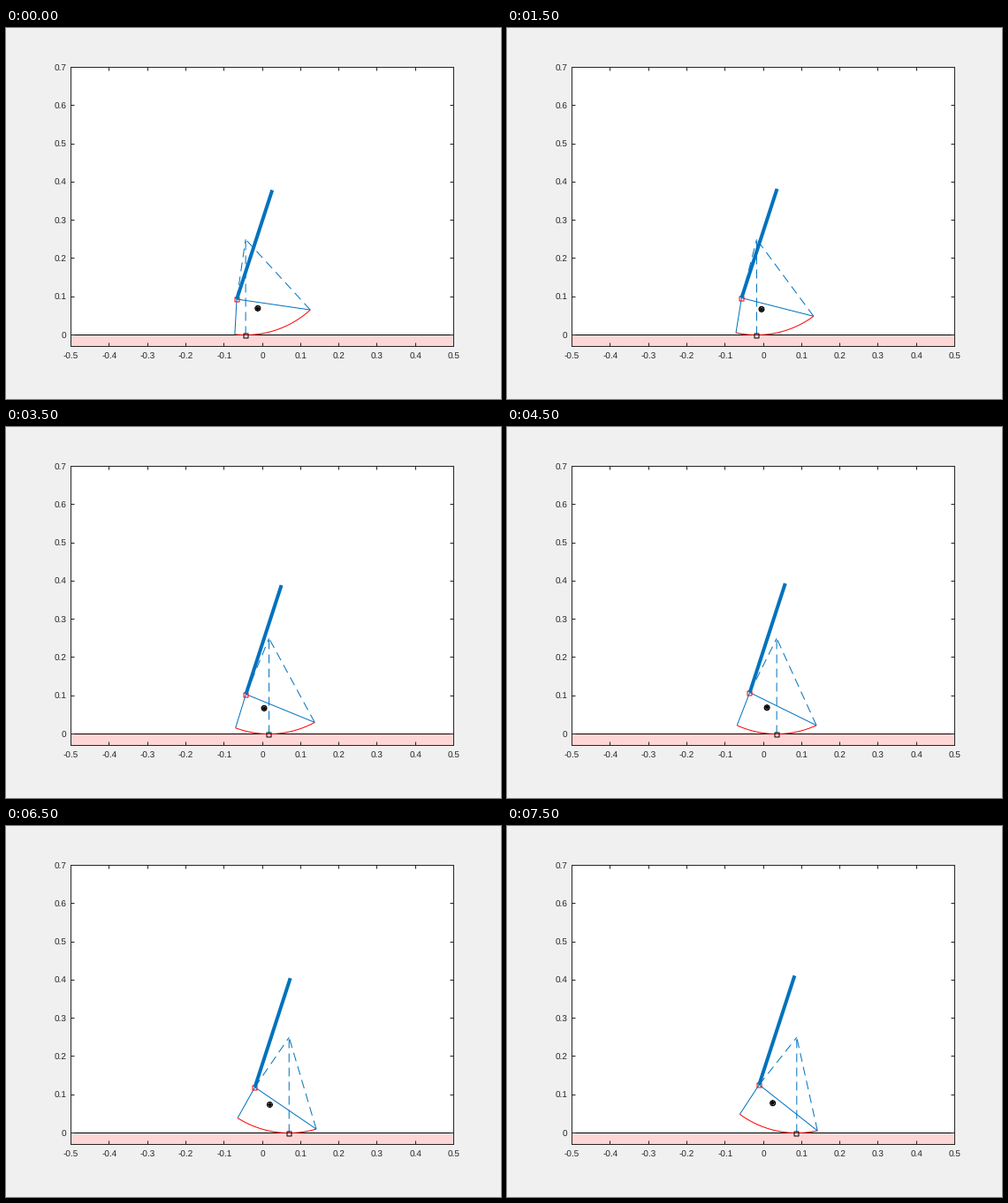
Animation of 560 by 420 pixels, one loop 8 s. Source, as a matplotlib script:

```python
import numpy as np
import matplotlib.pyplot as plt
from matplotlib.animation import FuncAnimation
from matplotlib.transforms import Affine2D

W, H, DPI = 560, 420, 70
PX = 72 / DPI                      # one pixel in points
FRAMES, INTERVAL = 16, 500

BLUE, RED, DARK = "#0072bd", "#ff0000", "#262626"
LEFT, TOP, WIDTH, HEIGHT = 73, 44, 433, 316  # axes box in pixels
XLIM, YLIM = (-0.5, 0.5), (-0.03, 0.7)
XTICKS, YTICKS = np.linspace(-0.5, 0.5, 11), np.linspace(0, 0.7, 8)

# Foot in its own frame, origin at the centre of the rolling arc
R = 0.25
HEEL, TOE = np.radians([-16.5, 32.5])
ARC = np.linspace(HEEL, TOE, 60)
SOLE = R * np.array([np.sin(ARC), -np.cos(ARC)])
ANKLE = np.array([-0.05, -0.15])
MASS = np.array([0.0, -0.183])
LEAN = np.radians(18)
SHANK = 0.3 * np.array([np.sin(LEAN), np.cos(LEAN)])

# Circle with an eight-armed star, three pixels in radius
TURNS = np.radians(np.arange(0, 361, 15))
RING = np.array([np.cos(TURNS), np.sin(TURNS)])
ARMS = [p for k in range(0, 24, 3) for p in ((np.nan, np.nan), (0, 0), RING[:, k])]
BADGE = np.hstack([RING, np.transpose(ARMS)]) * 3 / WIDTH

plt.rcParams["font.family"] = "Liberation Sans"
plt.rcParams["text.hinting"] = "none"
fig = plt.figure(figsize=(W / DPI, H / DPI), dpi=DPI, facecolor="#f0f0f0")
ax = fig.add_axes([LEFT / W, 1 - (TOP + HEIGHT) / H, WIDTH / W, HEIGHT / H])
ax.set(xlim=XLIM, ylim=YLIM, facecolor="white", xticks=XTICKS, yticks=YTICKS)
ax.tick_params(direction="in", length=4.5 * PX, width=PX, color=DARK,
               top=True, right=True, labelbottom=False, labelleft=False)
for spine in ax.spines.values():
    spine.set(linewidth=PX, color=DARK)

# Snapped strokes land half a pixel right and down; free ones are moved to match
free = ax.transData + Affine2D().translate(0.5, -0.5)
grid = ax.transData + Affine2D().translate(0, -1)


def label(x, y, value, ha):
    text = "0" if abs(value) < 1e-9 else f"{value:.1f}"
    fig.text(x / W, 1 - y / H, text, ha=ha, va="baseline",
             size=10 * PX, color=DARK)


for v in XTICKS:
    label(LEFT + 0.5 + (v - XLIM[0]) * WIDTH, 375, v, "center")
for v in YTICKS:
    label(68.5, TOP + 0.5 + (YLIM[1] - v) * WIDTH + 4, v, "right")

ax.fill_between(XLIM, YLIM[0], 0, color="#ffd6d6", linewidth=0, zorder=0.5)
ax.plot(XLIM, (0, 0), color="black", lw=PX, zorder=1)


def line(color, lw=1, **kw):
    kw.setdefault("solid_capstyle", "butt")
    return ax.plot([], [], color=color, lw=lw * PX, transform=free,
                   snap=False, zorder=2, **kw)[0]


def dashed():
    return line(BLUE, dashes=(10, 6), dash_capstyle="butt")


def square(color):
    return ax.scatter([0], [0], s=(5 * PX) ** 2, marker="s", lw=PX,
                      facecolors=[(0, 0, 0, 0)], edgecolors=[color],
                      transform=grid, snap=False, zorder=2)


foot = line(BLUE)
sole = line(RED)
spokes = [dashed() for _ in range(3)]
joint = square(RED)
contact = square("black")
badge = line("black")
shank = line(BLUE, 4)


def path(artist, *points):
    artist.set_data(*np.transpose(points))


def update(i):
    roll = np.radians(-10 + 2 * i)
    c, s = np.cos(roll), np.sin(roll)
    turn = np.array([[c, s], [-s, c]])
    hub = np.array([R * roll, R])
    ground = np.array([hub[0], 0])
    arc = turn @ SOLE + hub[:, None]
    ankle = turn @ ANKLE + hub
    mass = turn @ MASS + hub
    heel, toe = arc[:, 0], arc[:, -1]

    sole.set_data(*arc)
    path(foot, heel, ankle, toe)
    for spoke, end in zip(spokes, (ankle, toe, ground)):
        path(spoke, end, hub)
    joint.set_offsets([ankle])
    contact.set_offsets([ground])
    badge.set_data(*(BADGE + mass[:, None]))
    path(shank, ankle, ankle + SHANK)
    return foot, sole, *spokes, joint, contact, badge, shank


anim = FuncAnimation(fig, update, frames=FRAMES, interval=INTERVAL,
                     repeat=True, repeat_delay=0, blit=False)
plt.show()
```
